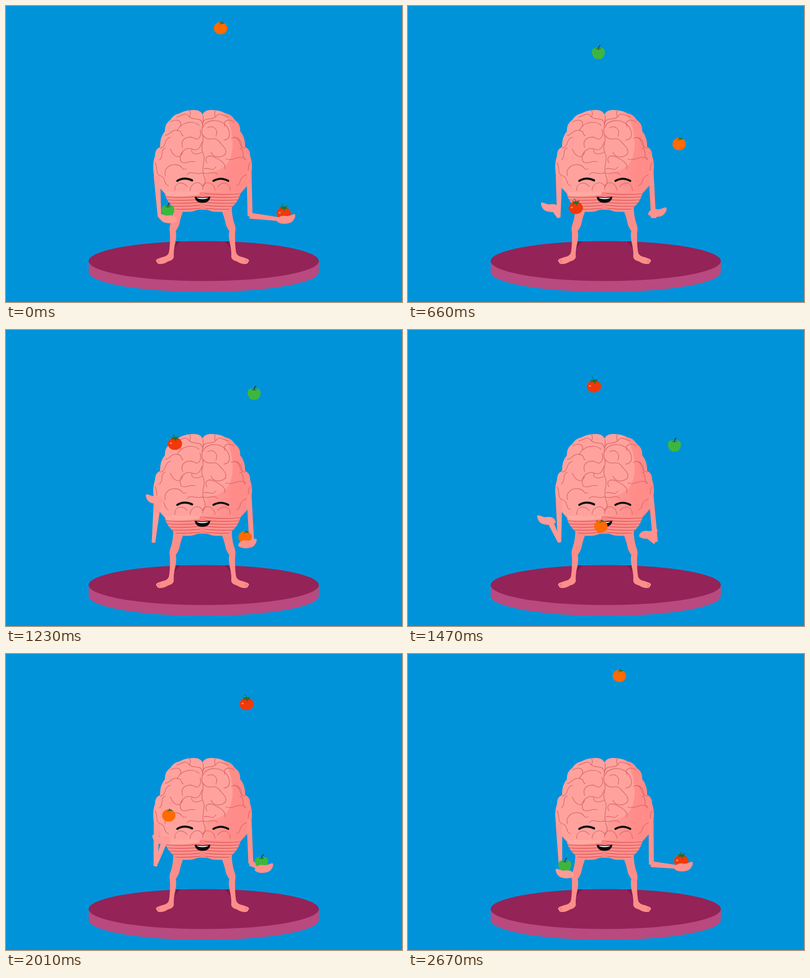
Recreate the animation shown at these times as an HTML page. Size 800 px wide and 600 px high, loop 2.7 s.

```html
<!DOCTYPE html>
<html lang="en">
<head>
<meta charset="utf-8">
<title>Juggling brain</title>
<style>
  html, body { margin: 0; width: 100%; height: 100%; overflow: hidden; background: #0093da; }
  svg { display: block; width: 800px; height: 600px; }
  .folds { fill: none; stroke: #d9686b; stroke-width: 1.3; stroke-linecap: round; }
  .limb { stroke-width: 2; stroke-linejoin: round; }
  .left { fill: #ff9b96; stroke: #ff9b96; }
  .right { fill: #fd918d; stroke: #fd918d; }
  .hand { stroke: none; }
  .mirror { transform: matrix(-1, 0, 0, 1, 794, 0); }
</style>
</head>
<body>
<svg viewBox="0 0 800 600">
  <defs>
    <path id="brain" d="M398 224C396 213 387 210 376 211Q362 211 350 218Q338 220 332 231Q320 239 321 254Q311 265 311 286Q301 290 301 304Q296 318 298 335Q299 357 310 368L318 377H398Z"/>
    <clipPath id="inRight"><use href="#brain" class="mirror"/></clipPath>
    <path id="lobe" d="M315 370H398V413C388 410 384 416 372 417Q350 419 340 410Q325 397 321 382Z"/>
    <clipPath id="inLobe"><use href="#lobe"/></clipPath>
    <linearGradient id="shade" gradientUnits="userSpaceOnUse" x1="398" x2="460">
      <stop stop-color="#ff9c97"/><stop offset="1" stop-color="#ff8c89"/>
    </linearGradient>
    <path id="palm" d="M-19 4C-17-6-8-8 2-6C10-7 12-10 17-10C21-8 16 4 9 7C0 11-15 10-19 4Z"/>

    <g id="body">
      <path fill="#7b1c4b" d="M339 477H352Q345 486 337 494Z"/>
      <path fill="#fc8e8a" d="M338 405Q338 425 333 440Q329 449 331 458Q332 485 329 500Q327 507 316 509L305 513Q301 517 305 519Q305 523 311 523Q320 523 327 518Q339 515 339 508Q338 496 342 480Q345 466 343 456Q350 446 351 438Q354 424 361 408Z"/>
      <path fill="none" stroke="#d9686b" d="M306 516l5-1M307 520l4-2"/>
      <use href="#lobe" fill="#ff918d"/>
      <g id="stripes" class="folds" clip-path="url(#inLobe)"></g>
    </g>
    <g id="sideFolds" class="folds">
      <path d="M345 225C358 222 362 214 370 224S394 222 397 240M371 212Q374 218 371 224"/>
      <path d="M333 235C345 228 356 232 352 244M312 288C325 286 318 270 332 266"/>
      <path d="M301 318C308 326 300 340 312 344S318 362 328 364M310 312C320 304 310 292 322 288"/>
      <path d="M366 342C372 332 388 344 397 338M341 374C340 358 356 354 366 366M372 374C372 358 392 352 397 366"/>
    </g>
  </defs>

  <path fill="#b84a80" d="M167 517V539A232.500 40.500 0 0 0 632 539V517Z"/>
  <ellipse cx="399.500" cy="517" rx="232.500" ry="40.500" fill="#942357"/>
  <use href="#body"/>
  <use href="#body" class="mirror"/>
  <path fill="#ffa9a3" d="M320 377H391V382Q350 388 325 385Z"/>
  <path fill="#f98482" d="M393 368H401L403 414Q397 410 391 414Z"/>

  <use href="#brain" fill="#ffa29d"/>
  <use href="#brain" class="mirror" fill="#ffa29d"/>
  <path clip-path="url(#inRight)" fill="url(#shade)" d="M425 205Q452 225 456 258Q462 295 449 317Q435 335 408 337Q400 345 396 378H500V205Z"/>
  <use href="#sideFolds"/>
  <use href="#sideFolds" class="mirror"/>
  <g class="folds">
    <path d="M398 222C401 235 392 250 397 262S391 284 398 298S393 325 400 345S397 360 397 372"/>
    <path d="M322 262C330 262 334 250 346 252S352 262 358 263M346 253C352 236 378 230 390 242"/>
    <path d="M357 287C350 268 370 262 380 268S396 262 392 250M376 290C372 298 382 304 397 296"/>
    <path d="M357 297C350 312 338 305 332 290M354 316C346 300 362 284 376 290S394 282 396 276"/>
    <path d="M354 316C362 322 372 312 382 316M322 344C318 330 330 320 345 322S352 334 364 330"/>
    <path d="M398 246C402 230 430 228 442 240S456 270 440 272M407 247C418 240 430 250 424 264"/>
    <path d="M398 262C410 278 420 262 430 274S446 290 444 298S420 312 414 296"/>
    <path d="M406 318C398 304 412 302 420 306S446 318 442 330M400 330C412 326 416 338 424 326"/>
    <path d="M455 268C470 262 478 276 476 290M444 310C460 316 470 300 484 310"/>
  </g>

  <path fill="none" stroke="#0b0b0b" stroke-width="4.200" stroke-linecap="round" d="M346 354.500Q360 346 376 353.500M419 354.500Q434 346 449 354.500"/>
  <path fill="#0b0b0b" d="M381 386.500Q397 389 413 386.500Q411 399 397 399Q383 399 381 386.500Z"/>
  <path fill="#fff" d="M385 388.500Q397 390 409 388.500Q406 391.500 397 391.500Q388 391.500 385 388.500Z"/>

  <g id="arms"></g>
  <g id="tomato">
    <ellipse rx="14.500" ry="12.500" cy="1" fill="#f0390b"/>
    <ellipse cx="-8" rx="2" ry="1.500" fill="#ff9c78"/>
    <path fill="#2f6b25" d="M0-12L8-14L5-10L10-7L3-8L2-3L-1-8L-8-6L-4-10L-9-13Z"/>
    <path fill="none" stroke="#2f6b25" stroke-width="1.300" d="M0-11Q0-16-4-18"/>
  </g>
  <g id="apple">
    <path fill="#3db63f" d="M0-8C6-12 14-9 13 0C12 9 7 14 0 13C-7 14-12 9-13 0C-14-9-6-12 0-8Z"/>
    <path fill="none" stroke="#1f7d2c" stroke-width="1.500" d="M-5-8Q0-5 5-8"/>
    <path fill="none" stroke="#4a2a1c" stroke-width="1.600" d="M0-7Q0-12 4-15"/>
  </g>
  <g id="orange">
    <ellipse rx="13.500" ry="12.500" fill="#ff6a02"/>
    <path fill="#2f6b25" d="M0-10Q1-15 8-10Q4-8 0-10Z"/>
    <path fill="none" stroke="#2f6b25" stroke-width="1.200" d="M-2-7L0-11L2-14"/>
  </g>
  <g id="hands"></g>
</svg>

<script>
const STEP = 30, BEAT = 900, LOOP = 3 * BEAT;
// Moments in one fruit's cycle, counted from its rest in the left hand.
const THROW = 90, APEX = 880, CATCH = 1790, PASS = 2130, LAND = 2600;
const $ = id => document.getElementById(id);
const mix = (a, b, k) => a + (b - a) * k;

function add(parent, tag, attrs) {
  const el = document.createElementNS("http://www.w3.org/2000/svg", tag);
  for (const name in attrs) el.setAttribute(name, attrs[name]);
  return parent.appendChild(el);
}

for (let y = 374; y < 416; y += 6)
  add($("stripes"), "path", { d: `M314 ${y}Q355 ${y + 4} 393 ${y}`, stroke: "#dc5759" });

// Smooth curve through [time, x, y] poses that repeats every beat.
function track(...poses) {
  const n = poses.length;
  const pose = i => {
    const [t, x, y] = poses[(i + n) % n];
    return [t + Math.floor(i / n) * BEAT, x, y];
  };
  return time => {
    const t = time % BEAT;
    const i = poses.findLastIndex(p => p[0] <= t);
    const [a, b, c, d] = [-1, 0, 1, 2].map(k => pose(i + k));
    const span = c[0] - b[0], s = (t - b[0]) / span;
    return [1, 2].map(k => {
      const m = (c[k] - a[k]) / (c[0] - a[0]) * span;
      const w = (d[k] - b[k]) / (d[0] - b[0]) * span;
      const rise = c[k] - b[k];
      return b[k] + s * (m + s * (3 * rise - 2 * m - w + s * (m + w - 2 * rise)));
    });
  };
}

function makeArm(side, flip, shoulder, upperWidths, foreWidths, elbow, hand) {
  return {
    flip, shoulder, upperWidths, foreWidths, elbow, hand,
    upper: add($("arms"), "path", { class: "limb " + side }),
    fore: add($("arms"), "path", { class: "limb " + side }),
    palm: add($("hands"), "use", { href: "#palm", class: "hand " + side })
  };
}

const left = makeArm("left", -1, [305, 345], [11, 5], [5, 10],
  track([0, 310, 427], [330, 298, 430], [510, 306, 430], [820, 303, 426]),
  track([0, 327, 431], [60, 328, 430], [330, 301, 343], [510, 277, 372], [850, 311, 450]));
const right = makeArm("right", 1, [491, 335], [8, 8], [10, 5],
  track([0, 493, 425], [330, 496, 424], [480, 502, 428], [820, 490, 428]),
  track([0, 566, 432], [60, 567, 432], [330, 488, 433], [510, 477, 413], [840, 547, 430]));

const fruits = [
  { el: $("apple"), start: 0 },
  { el: $("tomato"), start: 860 },
  { el: $("orange"), start: 1800 }
];

function limb([ax, ay], [bx, by], [wa, wb]) {
  const len = Math.hypot(bx - ax, by - ay) || 1;
  const nx = (ay - by) / len / 2, ny = (bx - ax) / len / 2;
  return `M${ax + nx * wa} ${ay + ny * wa}L${bx + nx * wb} ${by + ny * wb}` +
    `L${bx - nx * wb} ${by - ny * wb}L${ax - nx * wa} ${ay - ny * wa}Z`;
}

function held(arm, t, dx, dy) {
  const [x, y] = arm.hand(t);
  return [x + dx, y + dy];
}

function fruitAt(t, start) {
  const u = (t - start + LOOP) % LOOP;
  if (u < THROW || u >= LAND) return held(left, t, 0, -17);
  if (u < CATCH) {
    const across = (1 - Math.cos(Math.PI * (u - THROW) / (CATCH - THROW))) / 2;
    const pull = u < APEX ? 0.0118 : 0.0096;
    return [mix(326, 558, across), 44 + pull * Math.abs(u - APEX) ** 1.55];
  }
  if (u < PASS) return held(right, t, -5, -13);
  const k = (u - PASS) / (LAND - PASS);
  return [mix(483, 300, k), mix(420, 424, k) - 24 * Math.sin(Math.PI * k)];
}

function draw(now) {
  const t = Math.floor(now / STEP) * STEP % LOOP;
  for (const arm of [left, right]) {
    const elbow = arm.elbow(t), [x, y] = arm.hand(t);
    arm.upper.setAttribute("d", limb(arm.shoulder, elbow, arm.upperWidths));
    arm.fore.setAttribute("d", limb(elbow, [x - arm.flip * 7, y + 1], arm.foreWidths));
    arm.palm.setAttribute("transform", `translate(${x} ${y}) scale(${arm.flip} 1)`);
  }
  for (const { el, start } of fruits)
    el.setAttribute("transform", `translate(${fruitAt(t, start)})`);
}

const begin = performance.now();
function tick() {
  draw(performance.now() - begin);
  requestAnimationFrame(tick);
}
tick();
</script>
</body>
</html>
```
